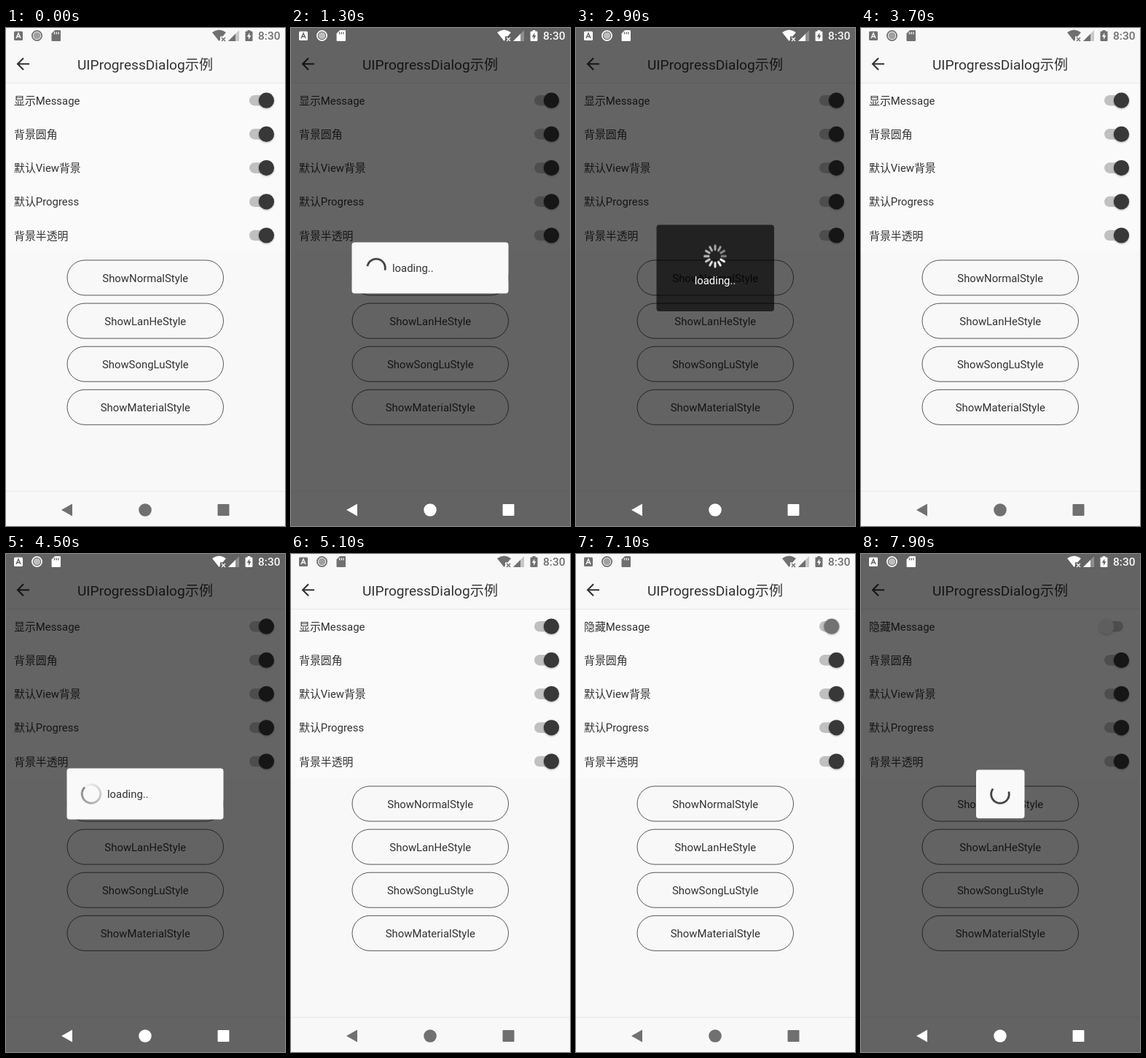
Recreate the animation shown at these times as an HTML page. Size 383 by 682 pixels, loop 8000 ms.

```html
<!DOCTYPE html>
<html lang="zh">
<head>
<meta charset="utf-8">
<title>Progress dialog demo</title>
<style>
html, body { margin: 0; width: 100%; height: 100%; overflow: hidden; background: #f8f8f8; }
svg { display: block; width: 383px; height: 682px; }
text { font: 14.9px Roboto, "Noto Sans CJK SC", "Noto Sans CJK", sans-serif; }
.mid { text-anchor: middle; }
.ink { fill: #333; }
.system { --bg: #f8f8f8; color: #707070; }
.dim .system { --bg: #636363; color: #fff; }

.dim, .dialog, .press, .knob, .shown, .hidden, .spin, .spokes, .ring {
  animation: 8s linear infinite;
}
.dim { animation-name: dim; }
.normal { animation-name: normal; }
.dark { animation-name: dark; }
.wide { animation-name: wide; }
.material { animation-name: material; }
.small { animation-name: small; }
.press { fill: #000; animation-name: press; }
.shown { animation-name: shown; animation-timing-function: step-end; }
.hidden { animation-name: hidden; animation-timing-function: step-end; }
.knob { fill: #383838; }
.toggle .knob { animation-name: toggle; }

@keyframes dim {
  0%, 8.62% { opacity: 0 }     9.94%, 20.75% { opacity: 1 }
  22.38%, 28.62% { opacity: 0 } 29.94%, 38.25% { opacity: 1 }
  39.88%, 47.38% { opacity: 0 } 48.69%, 62% { opacity: 1 }
  63.62%, 71.12% { opacity: 0 } 72.44%, 78.25% { opacity: 1 }
  79.88%, 97.38% { opacity: 0 } 98.69%, 100% { opacity: 1 }
}
@keyframes normal { 0%, 8.62%, 20%, 100% { opacity: 0 } 9.94%, 19.38% { opacity: 1 } }
@keyframes dark { 0%, 28.62%, 37.5%, 100% { opacity: 0 } 29.94%, 36.88% { opacity: 1 } }
@keyframes wide { 0%, 47.38%, 61.25%, 100% { opacity: 0 } 48.69%, 60.62% { opacity: 1 } }
@keyframes material { 0%, 71.12%, 77.5%, 100% { opacity: 0 } 72.44%, 76.88% { opacity: 1 } }
@keyframes small { 0%, 97.38% { opacity: 0 } 98.69%, 100% { opacity: 1 } }
@keyframes press { 0%, 1.24% { opacity: .1 } 1.25%, 100% { opacity: 0 } }
@keyframes shown { 0% { opacity: 1 } 88.75%, 100% { opacity: 0 } }
@keyframes hidden { 0% { opacity: 0 } 88.75%, 100% { opacity: 1 } }
@keyframes toggle {
  0%, 87.6% { transform: none; fill: #383838 }
  91.2%, 100% { transform: translateX(-20.5px); fill: #ececec }
}

/* Indeterminate arc: grows, then its tail catches up, while the whole turns. */
.spin { animation-name: spin; }
.arc {
  fill: none; stroke: #333; stroke-width: 2.6;
  animation: arc calc(8s / 6) cubic-bezier(.4, 0, .2, 1) infinite;
  animation-delay: var(--phase);
}
@keyframes spin { to { transform: rotate(864deg) } }
@keyframes arc {
  0% { stroke-dasharray: 10 350; stroke-dashoffset: 0 }
  50% { stroke-dasharray: 270 90; stroke-dashoffset: 0 }
  100% { stroke-dasharray: 10 350; stroke-dashoffset: -360 }
}
.spokes { stroke: #fff; stroke-width: 3; stroke-linecap: round; animation-name: spokes; animation-timing-function: step-end; }
@keyframes spokes {
  0% { transform: rotate(-90deg) }
  32.5% { transform: rotate(-60deg) }
  33.75% { transform: rotate(-30deg) }
  36.25%, 100% { transform: none }
}
.ring { fill: none; stroke: #777; stroke-width: 2.6; animation-name: ring; }
@keyframes ring {
  0%, 47% { transform: none }
  51.25%, 52.5% { transform: rotate(120deg) }
  56.25%, 57.5% { transform: rotate(225deg) }
  61.25%, 100% { transform: rotate(330deg) }
}
</style>
</head>
<body>
<svg viewBox="0 0 383 682">
  <defs>
    <filter id="shadow" x="-30%" y="-30%" width="160%" height="170%">
      <feDropShadow dx="0" dy="1" stdDeviation="1" flood-opacity=".3"/>
    </filter>
    <g id="icons" fill="currentColor">
      <rect x="11" y="4.500" width="12" height="12.500" rx="1.500"/>
      <path d="M14 14L17 7L20 14M15.200 11.800H18.800" fill="none" style="stroke:var(--bg)" stroke-width="1.400"/>
      <circle cx="42.500" cy="10.500" r="6.600" fill="none" stroke="currentColor" stroke-width="1.800"/>
      <circle cx="42.500" cy="10.500" r="4.800" opacity=".65"/>
      <path d="M67 3H74Q75 3 75 4V17Q75 18 74 18H63.500Q62.500 18 62.500 17V7.500Z"/>
      <path d="M66.500 5.500V8.500M69.300 5.500V8.500M72 5.500V8.500" style="stroke:var(--bg)" stroke-width="1.300"/>
      <path d="M283 6Q292.500 -1 302 6L297.500 11.500H294V16L292.500 18Z"/>
      <path d="M296 13L301 18M301 13L296 18" stroke="currentColor" stroke-width="1.400"/>
      <path d="M320 3V18H305Z" opacity=".35"/>
      <path d="M315 8V18H305Z"/>
      <path d="M331.500 3H335.500V4.500H337.500Q338.500 4.500 338.500 5.500V17Q338.500 18 337.500 18H329.500Q328.500 18 328.500 17V5.500Q328.500 4.500 329.500 4.500H331.500Z"/>
      <path d="M334.300 6.500L330.800 12H333V16L336.400 10.300H334.300Z" style="fill:var(--bg)"/>
      <text x="346" y="16.300" style="font-size:15.500px;font-weight:500">8:30</text>
      <path d="M76 660L91 651.500V668.500Z"/>
      <circle cx="191" cy="660" r="8.800"/>
      <rect x="290.500" y="652" width="16" height="16" rx="1"/>
    </g>
    <circle id="disc" cx="357.500" r="10.600" filter="url(#shadow)"/>
  </defs>

  <rect width="383" height="682" fill="#f8f8f8"/>
  <rect y="76" width="383" height="231" fill="#fafafa"/>
  <path d="M0 75.500H383M0 634.500H383" stroke="#e8e8e8"/>
  <path d="M32 49.300H16.500M24 41.300L16 49.300L24 57.300" fill="none" stroke="#333" stroke-width="2.100"/>
  <text class="mid ink" x="191" y="56.500" style="font-size:19.150px">UIProgressDialog示例</text>
  <g id="rows"></g>
  <g id="buttons"></g>
  <use class="system" href="#icons"/>

  <g class="dim">
    <rect width="383" height="682" opacity=".6"/>
    <use class="system" href="#icons"/>
  </g>

  <g id="dialogs">
    <g class="dialog dark">
      <rect x="110.500" y="269.500" width="161.500" height="118.500" rx="4" opacity=".66"/>
      <g transform="translate(191 312.500)"><g class="spokes" id="spokes"></g></g>
      <text class="mid" x="191" y="350.500" fill="#fff">loading..</text>
    </g>
  </g>
</svg>
<script>
const $ = id => document.getElementById(id);
const add = (id, html) => $(id).insertAdjacentHTML('beforeend', html);
const range = n => [...Array(n).keys()];

const labels = ['显示Message', '背景圆角', '默认View背景', '默认Progress', '背景半透明'];
labels.forEach((label, i) => {
  const y = 99.2 + i * 46.2;
  const text = (cls, s) => `<text class="ink ${cls}" x="11" y="${y + 5.6}">${s}</text>`;
  add('rows', (i ? text('', label) : text('shown', label) + text('hidden', '隐藏Message')) +
    `<g class="${i ? '' : 'toggle'}">
      <rect x="334" y="${y - 7.3}" width="26" height="14.600" rx="7.300" fill="#c0c0c0"/>
      <g class="knob"><use href="#disc" y="${y}"/></g>
    </g>`);
});

const pill = (i, attrs) =>
  `<rect x="84" y="${318 + i * 59.1}" width="214.500" height="48" rx="24" ${attrs}/>`;
['Normal', 'LanHe', 'SongLu', 'Material'].forEach((name, i) => add('buttons',
  pill(i, 'fill="none" stroke="#444" stroke-width=".9"') +
  `<text class="mid ink" x="191.300" y="${347.6 + i * 59.1}">Show${name}Style</text>`));
[500, 2100, 3600, 5500, 7600].forEach((t, i) => add('buttons',
  pill(i % 4, `class="press" style="animation-delay:${t - 8000}ms"`)));

const arc = (turn, phase) => `<g transform="rotate(${turn})"><g class="spin">
  <circle class="arc" r="12.300" pathLength="360" style="--phase:${phase}ms"/></g></g>`;
const ring = '<g class="ring">' + range(30).map(i =>
  `<circle r="12.700" pathLength="30" stroke-dasharray="1.050 28.950"
    transform="rotate(${i * 12})" opacity="${(i + 1) / 30}"/>`).join('') + '</g>';
const card = (cls, spinner) => `<g class="dialog ${cls}">
  <rect x="83.500" y="293.500" width="215" height="70" rx="4" fill="#f9f9f9"/>
  <g transform="translate(117 328.500)">${spinner}</g>
  <text class="ink" x="139" y="334.300">loading..</text></g>`;

add('dialogs', card('normal', arc(50, -319)) + card('wide', ring) + card('material', arc(50, -319)) +
  `<g class="dialog small">
    <rect x="158" y="295.500" width="66.500" height="66.500" rx="4" fill="#f9f9f9"/>
    <g transform="translate(191 329)">${arc(-150, -487)}</g></g>`);

range(12).forEach(i => add('spokes',
  `<path d="M9 0H14.500" transform="rotate(${30 + i * 30})" opacity="${1 - i * 0.05}"/>`));
</script>
</body>
</html>
```
